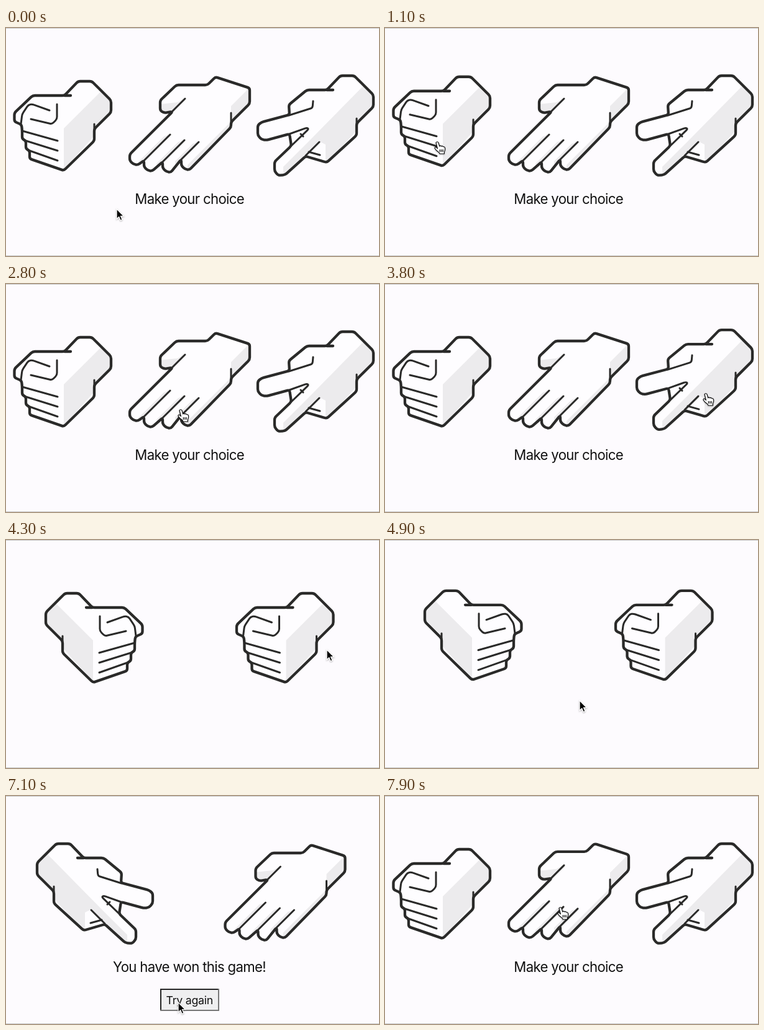
Animation, 600 px wide and 368 px high, one loop 8 s. Source, as an HTML page:

```html
<!DOCTYPE html>
<html lang="en">
<head>
<meta charset="utf-8">
<title>Make your choice</title>
<style>
  html, body { margin: 0; width: 100%; height: 100%; overflow: hidden; background: #fdfbfe; }
  svg { display: block; width: 100vw; height: 100vh; }
  text { font-family: Inter, "Liberation Sans", sans-serif; fill: #111; text-anchor: middle; }
  .title { font-size: 22.2px; letter-spacing: -0.67px; }
  .label { font-size: 17.8px; letter-spacing: -0.3px; }
  .edge, .line { fill: none; stroke: #2a2a29; stroke-linecap: round; stroke-linejoin: round; }
  .edge { stroke-width: 4.3; }
  .line { stroke-width: 3; }
  .skin { fill: #fefdff; }
  .shade { fill: #ecebed; }
  .cursor { filter: drop-shadow(0 1px 1px rgba(0, 0, 0, .3)); }
</style>
</head>
<body>
<svg viewBox="0 0 600 368" xmlns="http://www.w3.org/2000/svg">
  <defs id="defs"></defs>
  <rect width="600" height="368" fill="#fdfbfe"/>
  <path d="M0 .5H600M0 367.5H600" stroke="#c9c8ca"/>

  <g id="choice">
    <use id="rock" href="#rockHand"/>
    <use id="paper" href="#paperHand"/>
    <use id="scissors" href="#scissorsHand"/>
    <text class="title" x="295.2" y="284">Make your choice</text>
  </g>

  <g id="shake">
    <use href="#rockHand" transform="matrix(-1 0 0 1 233 0)"/>
    <use href="#rockHand" transform="translate(357.5 0)"/>
  </g>

  <g id="result">
    <use href="#scissorsHand" transform="matrix(-1 0 0 1 641 0)"/>
    <use href="#paperHand" transform="translate(153.5 0)"/>
    <text class="title" x="295" y="284">You have won this game!</text>
    <rect id="face" x="248" y="311" width="95" height="36" fill="#efeff0"/>
    <path id="lit" d="M249 347V312H343" fill="none" stroke-width="2"/>
    <path id="dim" d="M342 311V346H248" fill="none" stroke-width="2"/>
    <text class="label" x="295.2" y="335.5">Try again</text>
  </g>

  <path id="arrow" class="cursor" d="M0 0V16.2L3.7 12.8L6.1 18.6L9 17.4L6.6 11.7H11.6Z" stroke="#fff" stroke-width="1.3"/>
  <g id="pointer" class="cursor" stroke="#111" stroke-width="1.2" stroke-linejoin="round">
    <path d="M-2 1Q0 -1.5 2 1L3.7 7Q5 4.8 6.5 7Q8 5.5 9.4 7.6Q12 7 12.6 10Q13 13 11.4 16V19H4L3 17Q-2 14 -4 10Q-4 7 -1 9L.4 10.5Z" fill="#fff"/>
    <path d="M4.4 12V16M6.8 12V16M9.2 12V16"/>
  </g>
  <g id="beam" fill="none">
    <path id="stem" d="M-3.8 -9Q0 -9 0 -6.5Q0 -9 3.8 -9M0 -6.5V6.5M-3.8 9Q0 9 0 6.5Q0 9 3.8 9M-2 2.6H2" stroke="#fff" stroke-width="3"/>
    <use href="#stem" style="stroke: #222"/>
    <path d="M-3.8 -9Q0 -9 0 -6.5Q0 -9 3.8 -9M0 -6.5V6.5M-3.8 9Q0 9 0 6.5Q0 9 3.8 9M-2 2.6H2" stroke="#222" stroke-width="1.4"/>
  </g>
</svg>
<script>
const LOOP = 8000, STEP = 100, LIFT = 8.4;
const $ = id => document.getElementById(id);

const pts = s => s.split(' ').map(p => p.split(',').map(Number));
const shift = (list, dx, dy) => list.map(([x, y]) => [x + dx, y + dy]);
// A 45° stroke rising to the right.
const rise = ([x, y], len) => [[x, y], [x + len, y - len]];

// Polyline with softened corners.
function roundPath(list, closed) {
  const n = list.length;
  const toward = (a, b) => {
    const d = Math.hypot(b[0] - a[0], b[1] - a[1]);
    const k = Math.min(3.5, d / 2) / d;
    return [a[0] + (b[0] - a[0]) * k, a[1] + (b[1] - a[1]) * k];
  };
  return list.map((p, i) => {
    const cmd = i ? 'L' : 'M';
    if (!closed && i % (n - 1) === 0) return cmd + p;
    return cmd + toward(p, list[(i + n - 1) % n]) + 'Q' + p + ' ' + toward(p, list[(i + 1) % n]);
  }).join('') + (closed ? 'Z' : '');
}

function hand(id, edge, shades, lines, ticks = []) {
  const path = (cls, d) => `<path class="${cls}" d="${d}"/>`;
  const outline = roundPath(edge, true);
  $('defs').innerHTML += `<g id="${id}">` + path('skin', outline) +
    `<clipPath id="${id}Clip"><path d="${outline}"/></clipPath><g clip-path="url(#${id}Clip)">` +
    shades.map(s => path('shade', 'M' + s.join('L') + 'Z')).join('') + '</g>' +
    path('edge', outline) +
    ticks.map(s => path('edge', roundPath(s))).join('') +
    lines.map(s => path('line', roundPath(s))).join('') + '</g>';
}

// Wrist and forearm, shared by rock and scissors.
const arm = pts('94,109 116,86 138,86 169,117 169,136 142,163 142,182');
const cuff = pts('94,109 104,109'), crease = pts('142,155 142,168');
const armShade = pts('93,229 93,162 165,90 190,120');

const knuckles = [0, 1, 2].map(i => [26 + 6 * i, 166 + 16 * i]);
hand('rockHand',
  [...arm, [93, 230],
    ...knuckles.flatMap(([x, y]) => [[x, y], [x, y + 13]]).reverse(),
    ...pts('25,156 13.5,151 13.5,137 43,109')],
  [armShade],
  [crease, pts('82,123 82,147 74,155 40,147'), pts('70,133 42,123 36,124 26,139 24,155'),
    ...knuckles.map(([x, y]) => [[x, y], [83, y + 16]])],
  [cuff]);

const tips = pts('199,204 222,214 252,216 282,212');
const clefts = tips.slice(1).map((p, i) => rise(p, 42 - 7 * i));
hand('paperHand',
  [...pts('324,92 274,92 248,117 248,133 254,137 268,135'),
    ...tips.flatMap(p => shift(pts('0,0 0,10 6,16 13,17'), ...p)),
    ...pts('362,160 362,152 392,122 392,97 337,79')],
  [pts('248,123 276,120 288,113 268,138 248,140'),
    pts('362,126 392,96 392,126 362,160'),
    pts('363,150 292,221 292,232 366,160'),
    ...clefts.map(([a, b]) => [a, b, [b[0] - 10, b[1] + 3], [a[0] - 10, a[1] + 3], [a[0] - 10, a[1] + 17]])],
  [rise([268, 134], 20), ...clefts, pts('362,137 362,152')]);

const place = list => shift(list, 422, -9);
hand('scissorsHand',
  [...place(arm), ...pts('516,217 482,207 449,237 438,238 432,231 432,216 459,190 456,171 419,181 411,180 405,173 405,157 411,152 456,140 455,124 484,100')],
  [[...place(armShade.slice(2)), ...pts('514,222 514,188 504,183 446,242 446,224 487,183')]],
  [place(crease), pts('494,118 493,129 455,141'), pts('456,171 484,161 487,163 459,190'),
    pts('474,171 478,175'), rise([482, 206], 22), pts('487,200 505,205')],
  [place(cuff)]);

// Cursor moves: start, end, x, y.
const home = [178, 292];
const moves = [
  [0, 300, 84, 276], [600, 1100, 84, 184], [1600, 2100, 281, 203], [2800, 3300, 516, 177],
  [4600, 4900, 313, 259], [4900, 5900, 303, 261], [6200, 6800, 277, 333], [7400, 7900, 282, 180]
];
const hovers = [
  ['rock', 720, 1700], ['paper', 1800, 2950], ['scissors', 3000, 4250], ['paper', 7730, LOOP]
];
const within = (t, a, b) => t >= a && t < b;
const easeOut = k => 1 - (1 - k) ** 2;
const bounce = ms => -LIFT * Math.sin(Math.PI * ms / 1000) ** 2;
const show = (id, on) => $(id).setAttribute('display', on ? 'inline' : 'none');
const move = (id, x, y) => $(id).setAttribute('transform', `translate(${x} ${y})`);

function cursorAt(t) {
  return moves.reduce(([x, y], [from, to, nx, ny]) => {
    const k = easeOut(Math.min(1, Math.max(0, (t - from) / (to - from))));
    return [x + (nx - x) * k, y + (ny - y) * k];
  }, home);
}

function draw(t) {
  const shaking = within(t, 4250, 5650), done = within(t, 5650, 7150);
  show('choice', !shaking && !done);
  show('shake', shaking);
  show('result', done);

  const hover = hovers.find(h => within(t, h[1], h[2]));
  for (const id of ['rock', 'paper', 'scissors'])
    move(id, 0, hover && hover[0] === id ? bounce(t - hover[1]) : 0);
  move('shake', 0, t > 4650 ? bounce(t - 4650) : 0);

  const pressed = within(t, 7050, 7150);
  $('lit').setAttribute('stroke', pressed ? '#252525' : '#777');
  $('dim').setAttribute('stroke', pressed ? '#777' : '#252525');

  const [x, y] = cursorAt(t);
  const onText = !shaking && within(y, 258, 292) && Math.abs(x - 295) < (done ? 123 : 88);
  const kind = hover ? 'pointer' : onText ? 'beam' : 'arrow';
  for (const id of ['arrow', 'pointer', 'beam']) {
    show(id, id === kind);
    move(id, x, y);
  }
}

function tick(now) {
  draw(Math.floor(now % LOOP / STEP) * STEP);
  requestAnimationFrame(tick);
}
draw(0);
requestAnimationFrame(tick);
</script>
</body>
</html>
```
